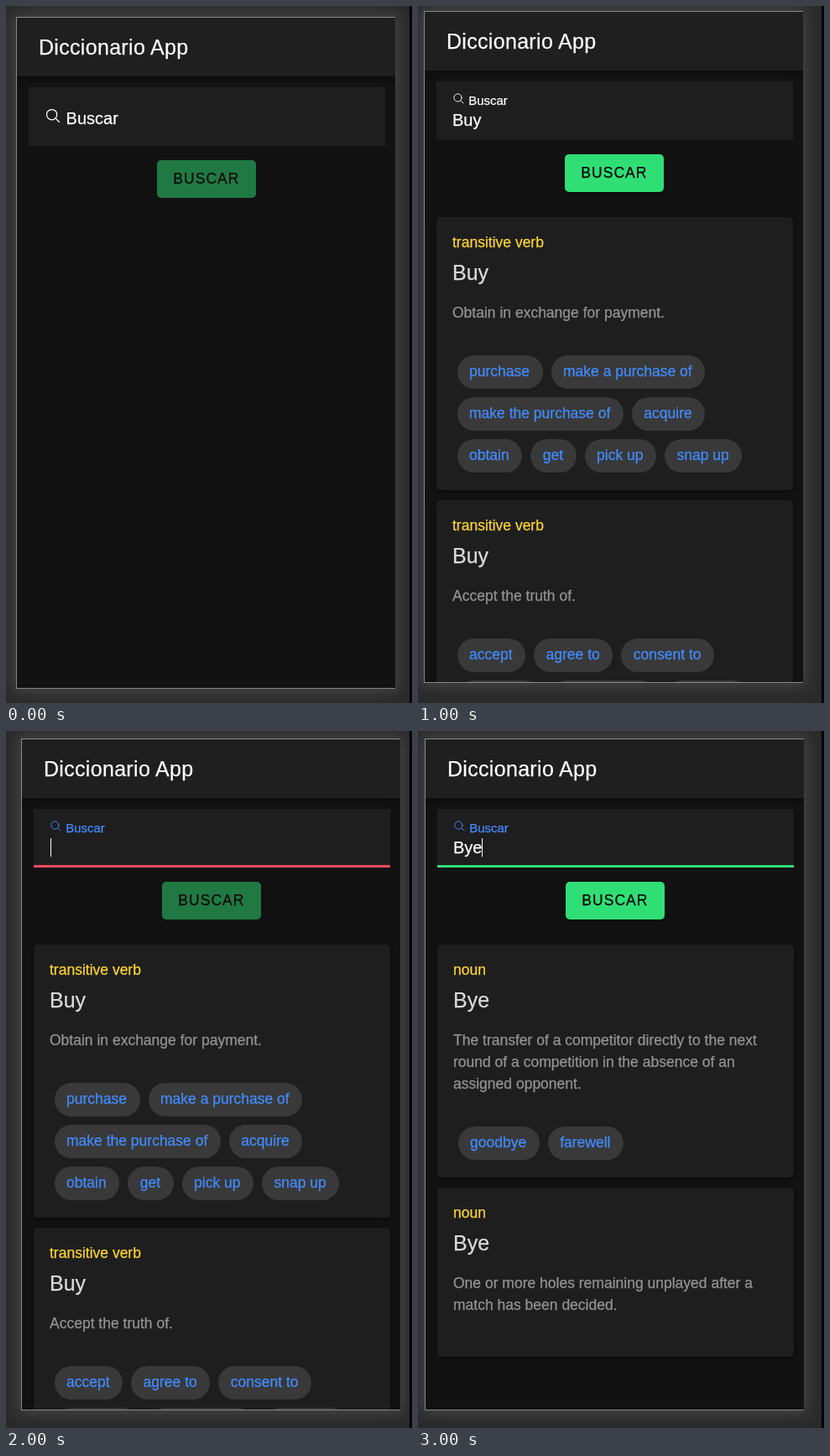
Write an HTML page that moves like this. It is 484 px wide and 832 px high and loops after 4 s.

```html
<!DOCTYPE html>
<html lang="es">
<head>
<meta charset="utf-8">
<title>Diccionario App</title>
<style>
  * { box-sizing: border-box; margin: 0; }
  html, body { width: 100%; height: 100%; overflow: hidden; background: #2a2a2a; }
  body { font: 17.5px/1.2 "Liberation Sans", Arial, sans-serif; color: #fff;
    -webkit-text-stroke: .25px; }

  .scene { position: absolute; inset: 0; overflow: hidden; background: #2a2a2a;
    opacity: 0; animation: show 4s step-end infinite; }
  @keyframes show { 0% { opacity: 1; } 25%, 100% { opacity: 0; } }
  .edge { position: absolute; top: 0; right: 0; width: 3px; height: 100%; background: #000; }

  .screen { position: absolute; width: 452px; height: 802px; overflow: hidden;
    background: #121212; border: solid #85878a; border-width: 1px 0 1px 1px;
    box-shadow: 0 0 16px 4px #454545; }
  .screen > * { position: absolute; }

  header { left: 0; top: 0; width: 100%; height: 70px; padding-left: 26px;
    background: #1f1f1f; font-size: 25px; line-height: 70px; letter-spacing: .0125em;
    box-shadow: 0 2.5px 5px -1px #0003, 0 5px 6px #0002, 0 1px 12px #0002; }

  .field { left: 13.5px; top: 82.5px; width: 425px; height: 70px; background: #1e1e1e; }
  .field.focus { border-bottom: 3px solid var(--line); }
  .label { left: 33px; top: 107px; font-size: 20px; line-height: 1; white-space: nowrap; }
  .label.up { top: 96px; font-size: 15px; }
  .label.focus { color: #428cff; }
  .label svg { width: 1em; height: 1em; fill: none; stroke: currentColor;
    stroke-width: 32; stroke-linecap: round; }
  .value { left: 33px; top: 117px; font-size: 20px; line-height: 24px; }
  .caret { top: 118px; width: 1px; height: 22px; background: #fff; }

  .btn { left: 167px; top: 170px; width: 118px; height: 45px; padding-left: 19.25px;
    border-radius: 5px; background: #2fdf75; color: #000; line-height: 45px;
    letter-spacing: .06em; box-shadow: 0 4px 1px -2.5px #0003, 0 2px 3px #0002, 0 1px 6px #0002; }
  .btn.off { opacity: .5; box-shadow: none; }

  .cards { left: 13.5px; top: 245px; width: 425px; }
  .card { margin-bottom: 12.5px; padding: 20px 20px 16.25px 19.5px; border-radius: 5px;
    background: #1e1e1e; box-shadow: 0 4px 1px -2.5px #0003, 0 2px 3px #0002, 0 1px 6px #0002; }
  .kind { color: #ffd534; }
  h2 { margin: 10px 0 20px; font-size: 25px; font-weight: 400; line-height: 30px; color: #dbdbdb; }
  .card p { margin-bottom: 32.5px; line-height: 26px; color: #949494; }
  .chips { display: flex; flex-wrap: wrap; margin-left: .5px; }
  .chip { margin: 5px; padding: 0 15.5px 0 14.5px; height: 40px; border-radius: 20px;
    background: #393939; color: #428cff; line-height: 39px; white-space: nowrap; }
</style>
</head>
<body>
<script>
const buy = [
  ["transitive verb", "Buy", "Obtain in exchange for payment.",
    "purchase,make a purchase of,make the purchase of,acquire,obtain,get,pick up,snap up"],
  ["transitive verb", "Buy", "Accept the truth of.",
    "accept,agree to,consent to,assent to,acquiesce in,concur in"]
];
const bye = [
  ["noun", "Bye", "The transfer of a competitor directly to the next round of a competition in the absence of an assigned opponent.",
    "goodbye,farewell"],
  ["noun", "Bye", "One or more holes remaining unplayed after a match has been decided.", ""]
];

// x, y: top left of the screen; line and caret appear while the field has focus
const scenes = [
  { x: 12, y: 13, value: "", cards: [] },
  { x: 7, y: 6, value: "Buy", cards: buy },
  { x: 18, y: 9, value: "", cards: buy, line: "#ff4961", caret: 34 },
  { x: 8, y: 9, value: "Bye", cards: bye, line: "#2fdf75", caret: 67 }
];

const div = (cls, body = "", style = "") =>
  `<div class="${cls}" style="${style}">${body}</div>`;

const icon = `<svg viewBox="0 0 512 512"><circle cx="221" cy="221" r="157"/><path d="M338 338L448 448"/></svg>`;

function card([kind, word, text, list]) {
  const chips = list ? list.split(",").map(s => div("chip", s)).join("") : "";
  return div("card", div("kind", kind) + `<h2>${word}</h2><p>${text}</p>` + div("chips", chips));
}

function scene(s, i) {
  const focus = s.line ? " focus" : "";
  const up = s.line || s.value ? " up" : "";
  const screen =
    div("cards", s.cards.map(card).join("")) +
    `<header>Diccionario App</header>` +
    div("field" + focus, "", `--line:${s.line || "none"}`) +
    div("label" + up + focus, icon + " Buscar") +
    div("value", s.value) +
    (s.caret ? div("caret", "", `left:${s.caret}px`) : "") +
    div("btn" + (s.value ? "" : " off"), "BUSCAR");
  return div("scene",
    div("screen", screen, `left:${s.x}px;top:${s.y}px`) + div("edge"),
    `animation-delay:${i - scenes.length}s`);
}

document.body.innerHTML = scenes.map(scene).join("");
</script>
</body>
</html>
```
